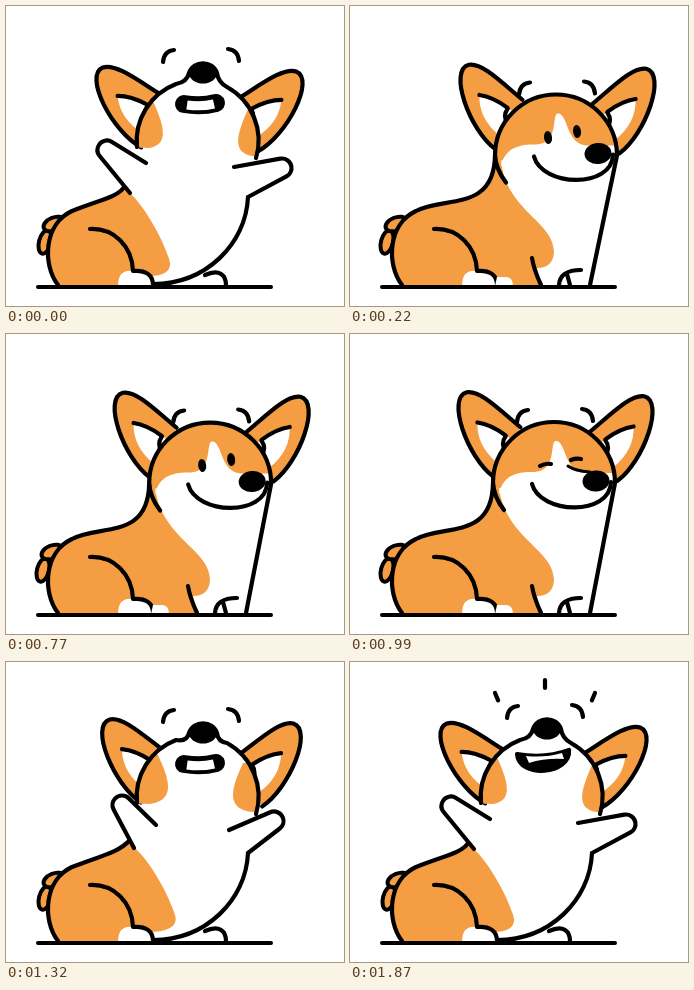
Write an HTML page with a canvas that moves like this. It is 338 by 300 pixels and loops after 1980 ms.

```html
<!DOCTYPE html>
<html lang="en">
<head>
<meta charset="utf-8">
<title>Laughing corgi</title>
<style>
html, body { margin: 0; width: 100%; height: 100%; overflow: hidden; background: #fff; }
canvas { display: block; width: 100vw; height: 100vh; }
</style>
</head>
<body>
<canvas id="stage" width="338" height="300"></canvas>
<script>
const ctx = document.getElementById('stage').getContext('2d');
const ORANGE = '#f59d43', WHITE = '#fff', BLACK = '#000';
const STEP = 110, STEPS = 18, HEAD_RADIUS = 61;
const HAUNCH = 'M52,279 C36,258 38,218 66,205';

const mix = (a, b, k) => a + (b - a) * k;
const mixPoint = (a, b, k) => a.map((v, i) => mix(v, b[i], k));

function fill(path, color) {
  ctx.fillStyle = color;
  ctx.fill(new Path2D(path));
}

function line(path, width = 4.2) {
  ctx.lineWidth = width;
  ctx.stroke(new Path2D(path));
}

function outlined(path, color) {
  fill(path, color);
  line(path);
}

function oval(x, y, rx, ry, turn = 0, color = BLACK) {
  ctx.beginPath();
  ctx.ellipse(x, y, rx, ry, turn, 0, 2 * Math.PI);
  ctx.fillStyle = color;
  ctx.fill();
}

function at(x, y, draw, { turn = 0, flip = 1 } = {}) {
  ctx.save();
  ctx.translate(x, y);
  ctx.scale(flip, 1);
  ctx.rotate(turn);
  draw();
  ctx.restore();
}

function clipped(path, draw) {
  ctx.save();
  ctx.clip(new Path2D(path));
  draw();
  ctx.restore();
}

function ear() {
  outlined('M-25,13 C-36,-18 -20,-79 0,-72 C12,-67 17,-41 25,-13', ORANGE);
  const fold = 'M-8,-41 Q2,-32 8,-15';
  fill(fold + ' L14,0 L-14,4 Q-22,-22 -8,-41', WHITE);
  line(fold);
  line('M8,-14 Q-1,-11 -1,0');
}

function ears(x, y, degrees) {
  const turn = -degrees * Math.PI / 180;
  at(x - 47, y, ear, { turn });
  at(x + 50, y + 4, ear, { turn, flip: -1 });
}

function brows(x, y) {
  at(x, y, () => line('M-37,-61 Q-36,-72 -26,-73 M28,-74 Q38,-73 39,-62'));
}

function tail() {
  for (const [x, y, rx, ry, turn] of [[37, 236, 6, 12, .25], [46, 218, 11, 6.5, -.4]]) {
    oval(x, y, rx, ry, turn, ORANGE);
    ctx.lineWidth = 4;
    ctx.stroke();
  }
}

function hindLeg() {
  const paw = 'C140,264 147,269 147,279';
  fill('M112,280 Q112,263 127,265 ' + paw, WHITE);
  line('M84,223 C108,222 126,240 127,265 ' + paw);
}

function rearFoot() {
  outlined('M199,269 C214,262 220,270 220,279', WHITE);
}

function frontFeet() {
  fill('M145,280 L147,271 H157 Q163,272 163,280', WHITE);
  line('M182,252 Q184,264 191,279');
  line('M209,279 Q210,264 231,264 M217,268 L220,279');
}

function closedEyes() {
  line('M-14,-17 Q-9,-20 -3,-19 M17,-23 Q22,-25 27,-24');
  line('M14,-17 Q21,-12 36,-11', 3);
}

function openEyes() {
  oval(-8, -18, 4, 6.5, -.12);
  oval(21, -24, 4, 6.5, -.12);
}

function grin() {
  const lip = 'M-12,11 C8,22 50,20 55,-2';
  const jaw = 'M-12,11 C-26,30 0,30 12,29 Q26,28 30,18';
  fill(jaw, WHITE);
  oval(-13, 20, 4, 7);
  line(jaw);
  line(lip);
}

function foldedArms() {
  const arm = () => line('M-28,-16 Q-26,-9 -16,-9 Q0,-9 0,1 Q0,9 -14,10 L-36,14');
  at(208, 185, arm);
  at(208, 185, arm, { flip: -1 });
}

function facing({ x, y, closed = false, giggle = false }) {
  const left = x - HEAD_RADIUS, right = x + HEAD_RADIUS;
  const faceX = giggle ? x - 4 : x, faceY = giggle ? y - 9 : y;
  const side = giggle ? 'C250,190 248,278 147,278' : 'L240,279';
  const chest = giggle
    ? 'C140,190 186,215 188,242 Q188,266 147,272 L147,281'
    : 'C156,205 204,215 204,246 Q203,262 187,262 L191,281';
  const body = `${HAUNCH} C94,190 ${left - 1},206 ${left},${y} ` +
    `A${HEAD_RADIUS} ${HEAD_RADIUS} 0 0 1 ${right},${y} ${side}`;

  ears(x, y - 31, 34);
  fill(body, ORANGE);
  clipped(body, () => {
    fill(`M${x - 55},${y + 5} ${chest} H280 V${y} Z`, WHITE);
    const cheek = giggle ? 20 : -10;
    at(faceX, faceY, () => {
      if (giggle) fill(`M40,-12 H70 V${cheek} Q46,${cheek} 48,0 Z`, ORANGE);
      fill(`M2,-42 C-5,-42 4,-12 -20,-11 C-36,-11 -50,-9 -55,10 L48,10 ` +
        `${giggle ? 'L46,-10' : 'H70 V-10'} H30 C10,-12 12,-42 2,-42`, WHITE);
    });
  });
  line(body);
  hindLeg();

  if (giggle) {
    rearFoot();
    foldedArms();
  } else {
    frontFeet();
    line(`M${left},${y} Q${left + 1},${y + 14} ${left + 11},${y + 27}`);
  }
  at(faceX, faceY, () => {
    giggle ? grin() : line('M-22,1 C-14,31 56,34 57,-1');
    closed ? closedEyes() : openEyes();
    oval(42, -2, 13.5, 10.5, -.1);
  });
  brows(x, y);
}

// A tapered arm: two lines that touch a round hand.
function arm(top, hand, bottom, side) {
  const radius = 9.5;
  const touch = ([x, y], sign) => {
    const dx = x - hand[0], dy = y - hand[1];
    return Math.atan2(dy, dx) + sign * Math.acos(radius / Math.hypot(dx, dy));
  };
  ctx.beginPath();
  ctx.moveTo(...top);
  ctx.arc(...hand, radius, touch(top, -side), touch(bottom, side), side > 0);
  ctx.lineTo(...bottom);
  ctx.fillStyle = WHITE;
  ctx.fill();
  ctx.lineWidth = 4.2;
  ctx.stroke();
}

function smile() {
  line('M178,98 Q195,101 210,97', 18);
  ctx.lineCap = 'butt';
  ctx.strokeStyle = WHITE;
  line('M181,99 Q195,101 208,98', 9);
  ctx.strokeStyle = BLACK;
  ctx.lineCap = 'round';
}

function openMouth() {
  outlined('M167,92 Q195,97 219,88 C221,113 169,117 167,92', BLACK);
  fill('M176,94 Q195,96 212,91 L214,97 Q195,96 179,101 Z', WHITE);
}

function rays(x, y) {
  for (const i of [-1, 0, 1]) {
    at(x + 50 * i, y + 13 * Math.abs(i), () => line('M0,0 V8'), { turn: -.4 * i * -1 });
  }
}

function cheering({ lean = 0, spread = 1, laugh = false, rayY = null }) {
  const x = 192, y = 135, drop = 4 * lean;
  const back = `${HAUNCH} C94,194 112,191 ${118 + 6 * lean},${181 - 3 * lean}`;
  const side = 'C240,238 200,278 147,278';
  const edge = 6 * lean;

  fill(`${back} L131,140 H250 L242,191 ${side} Z`, WHITE);
  fill(`${back} L${124 + edge},187 C${134 + edge},196 ${152 + edge},222 ${162 + edge},250 ` +
    `Q${170 + edge},268 147,270 L130,279 Z`, ORANGE);
  line(back);
  line('M242,191 ' + side);
  rearFoot();
  hindLeg();

  ears(x + 2 * lean, y - 20, 42 - 5 * lean);
  const round = `A${HEAD_RADIUS} ${HEAD_RADIUS} 0 0 1`;
  const head = `M131,141 ${round} 170,78 Q181,${76 + drop} 183,${67 + drop} ` +
    `C187,${54 + drop} 207,${54 + drop} 211,${67 + drop} Q212,${76 + drop} 221,81 ${round} 250,152`;
  fill(head, WHITE);
  clipped(head, () => {
    const cheek = () => fill(`M${-46 + edge},-42 C${-36 + edge},-20 ${-26 + edge},4 -50,7 H-66 V-42 Z`, ORANGE);
    at(x, y, cheek);
    at(x + 5, y + 8, cheek, { flip: -1 });
  });
  line(head);
  at(0, drop, () => {
    oval(197, 67, 14, 10.5);
    laugh ? openMouth() : smile();
  });
  brows(x + 2, y - 18 + drop);

  arm(mixPoint([150, 163], [140, 157], spread), mixPoint([116, 143], [101, 144], spread),
    mixPoint([128, 186], [124, 187], spread), 1);
  arm(mixPoint([223, 168], [228, 161], spread), mixPoint([268, 159], [276, 162], spread),
    [242, 191], -1);
  if (rayY !== null) rays(195, rayY);
}

function pose(step) {
  if (step === 0) cheering({});
  else if (step === 1 || step === 11) facing({ x: 196, y: 143, closed: true, giggle: true });
  else if (step < 9) facing({ x: 204 + 2 * .6 ** (step - 2), y: 149.5, closed: step === 6 });
  else if (step < 11) facing({ x: mix(204, 200, step - 9), y: mix(149, 146, step - 9), closed: true });
  else if (step === 12) cheering({ lean: 1, spread: 0 });
  else {
    const peak = step % 2 === 1;
    cheering({ spread: peak ? 1 : .5, laugh: peak, rayY: peak ? 18 : 20 });
  }
}

function drawStep(step) {
  ctx.fillStyle = WHITE;
  ctx.fillRect(0, 0, 338, 300);
  ctx.lineCap = ctx.lineJoin = 'round';
  ctx.strokeStyle = BLACK;
  at(step === 0 || step > 11 ? 2 : 0, 0, tail);
  pose(step);
  line('M32,281 H265', 4);
}

const start = performance.now();
function tick() {
  drawStep(Math.floor((performance.now() - start) / STEP) % STEPS);
  requestAnimationFrame(tick);
}
tick();
</script>
</body>
</html>
```
